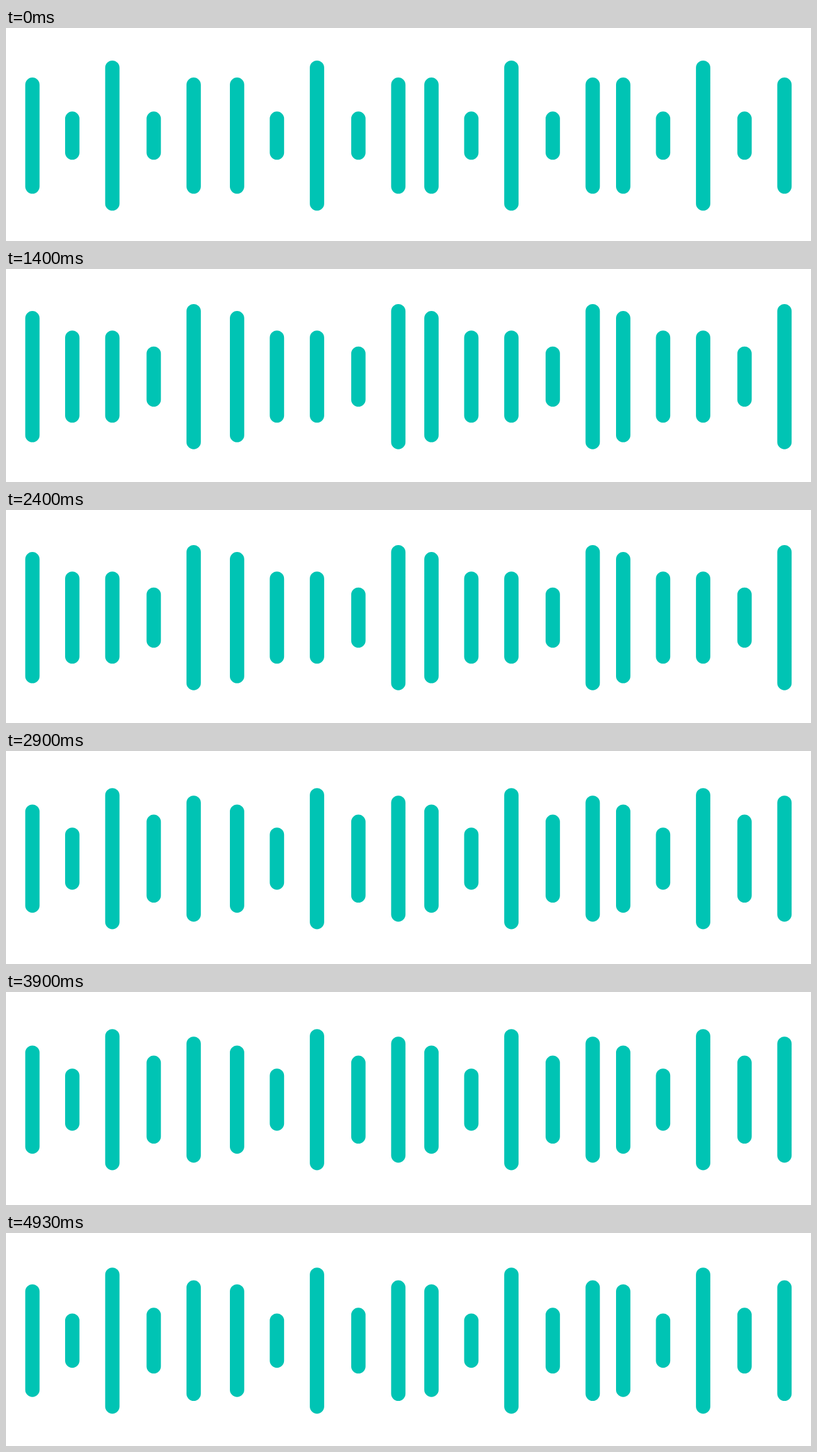
Animation of 1280x340 px, one loop 5.01 s. Source, as an HTML page with a canvas:

```html
<!DOCTYPE html>
<html lang="en">
<head>
<meta charset="utf-8">
<title>Sound wave</title>
<style>
html, body { margin: 0; width: 100%; height: 100%; overflow: hidden; background: #fff; }
canvas { display: block; }
</style>
</head>
<body>
<canvas width="1280" height="340"></canvas>
<script>
const ctx = document.querySelector('canvas').getContext('2d');
const LOOP = 5010, CYCLE = 30;     // ms, ticks
const UNIT = 54.2, MID = 171.8;    // length of one level, vertical centre
const groups = [0, 325.4, 634.5, 939.4];

// Each bar: centre x and its level at every quarter of the cycle
const bars = [
  { x: 42,    levels: [3, 2.1, 4, 2.2] },
  { x: 105.4, levels: [1, 3, 2, 2.4] },
  { x: 169.1, levels: [4, 3, 2, 3.1] },
  { x: 234.9, levels: [1, 2.2, 1, 5] },
  { x: 298.4, levels: [3, 3.5, 4, 4] }
];

const keyTick = quarter => Math.floor(quarter * CYCLE / 4);

// cubic-bezier(.42, 0, .58, 1)
function easeInOut(x) {
  const curve = (s, a, b) => 3 * (1 - s) ** 2 * s * a + 3 * (1 - s) * s * s * b + s ** 3;
  let lo = 0, hi = 1;
  for (let i = 0; i < 24; i++) {
    const mid = (lo + hi) / 2;
    if (curve(mid, 0.42, 0.58) < x) lo = mid; else hi = mid;
  }
  return curve(lo, 0, 1);
}

// The picture steps twice per 100 ms: at 0 and at 30
function tickAt(ms) {
  const t = Math.min(ms % LOOP, 4999);
  return (Math.floor(t / 100) * 3 + (t % 100 >= 30 ? 1 : 0)) % CYCLE;
}

function draw(ms) {
  const tick = tickAt(ms);
  let q = 0;
  while (keyTick(q + 1) <= tick) q++;
  const progress = easeInOut((tick - keyTick(q)) / (keyTick(q + 1) - keyTick(q)));

  ctx.clearRect(0, 0, 1280, 340);
  ctx.strokeStyle = '#00c4b4';
  ctx.lineWidth = 22.8;
  ctx.lineCap = 'round';
  ctx.beginPath();
  for (const { x, levels } of bars) {
    const from = levels[q], to = levels[(q + 1) % 4];
    const half = (from + (to - from) * progress) * UNIT / 2;
    for (const dx of groups) {
      ctx.moveTo(x + dx, MID - half);
      ctx.lineTo(x + dx, MID + half);
    }
  }
  ctx.stroke();
}

const start = performance.now();
function loop() {
  draw(performance.now() - start);
  requestAnimationFrame(loop);
}
loop();
</script>
</body>
</html>
```
